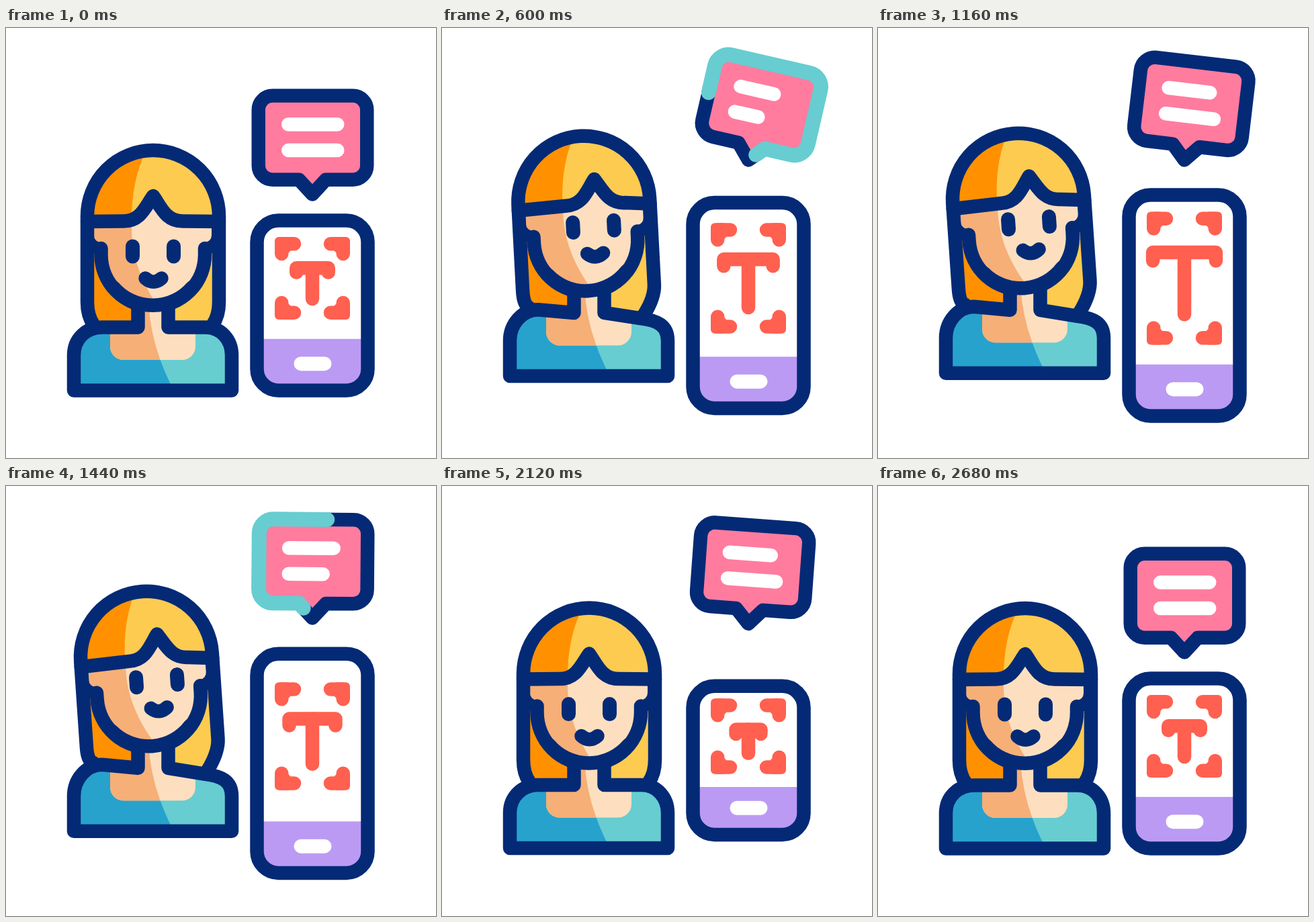
Write an HTML page with a canvas that moves like this. It is 640x640 px and loops after 3 s.

```html
<!DOCTYPE html>
<html lang="en">
<head>
<meta charset="utf-8">
<title>Text scanning</title>
<style>
html, body { margin: 0; width: 100%; height: 100%; overflow: hidden; background: #fff; }
canvas { display: block; width: 640px; height: 640px; }
</style>
</head>
<body>
<canvas id="stage" width="640" height="640"></canvas>
<script>
const ctx = document.getElementById('stage').getContext('2d');
const LOOP = 3000, STEP = 40, LINE = 20.5;
const C = {
  navy: '#042a76', orange: '#ff9100', yellow: '#fdcb50', skin: '#fddfbf', tan: '#f6af76',
  blue: '#27a2cd', teal: '#67cdd1', pink: '#ff7c9f', purple: '#bb9af3', red: '#ff6050', white: '#fff'
};

// ---- timing ----
const clamp = (v, lo, hi) => Math.min(hi, Math.max(lo, v));
const ease = (t, from, to) => (1 - Math.cos(Math.PI * clamp((t - from) / (to - from), 0, 1))) / 2;
// Rises from 0 to 1, holds, then falls back to 0.
const pulse = (t, rise, top, fall, end = t + 1) => ease(t, rise, top) - ease(t, fall, end);

// ---- drawing helpers ----
function fill(path, color) {
  ctx.fillStyle = color;
  ctx.fill(path);
}

function stroke(path, color, width = LINE) {
  ctx.strokeStyle = color;
  ctx.lineWidth = width;
  ctx.stroke(path);
}

function box(x, y, w, h, r = 0) {
  const path = new Path2D();
  path.roundRect(x, y, w, h, r);
  return path;
}

function scoped(draw) {
  ctx.save();
  draw();
  ctx.restore();
}

const clipped = (path, draw) => scoped(() => { ctx.clip(path); draw(); });
const line = (x1, y1, x2, y2) => new Path2D(`M${x1},${y1} L${x2},${y2}`);

function rotateAbout(x, y, angle) {
  ctx.translate(x, y);
  ctx.rotate(angle);
  ctx.translate(-x, -y);
}

// ---- woman ----
const MID = 219, NECK = 427, HAIR = 98, JAW = 77.25;

function drawHead(angle, sway) {
  const cos = Math.cos(angle), sin = Math.sin(angle);
  // Hair tips stay attached to the shoulders while the head tilts.
  const tip = (dx, dy) => [MID + dx * cos - dy * sin, NECK + dx * sin + dy * cos];
  const left = tip(-89 - sway, 14 - 4 * sway), right = tip(89 - 8 * sway, 14 + 8 * sway);
  const l = MID - HAIR, r = MID + HAIR;

  const hair = new Path2D(`M${left} Q${l},428 ${l},408 V280 A${HAIR},${HAIR} 0 0 1 ${r},280 V408 Q${r},428 ${right}`);
  fill(hair, C.yellow);
  clipped(hair, () => fill(new Path2D('M100,160 H222 Q184,214 187,300 L219,420 V460 H100 Z'), C.orange));

  // The parting slides sideways between its fixed ends.
  const p = dx => MID + dx + 18 * sway, low = 287.5 - 3 * sway, peak = low - 37.5;
  const fringe = `M${l},288 L${p(-44)},${low} C${p(-19)},${low} ${p(-12)},${peak + 17} ${p(0)},${peak}` +
    ` C${p(12)},${peak + 17} ${p(19)},${low} ${p(44)},${low} L${r},288`;

  fill(box(l, 288, 2 * HAIR, 47), C.navy);
  const face = new Path2D(fringe + ' Z');
  face.addPath(box(131, 280, 175, 39, [0, 0, 10.5, 10.5]));
  face.addPath(new Path2D(`M141.5,310 H296 V337 A${JAW},${JAW} 0 0 1 141.5,337 Z`));
  fill(face, C.skin);
  clipped(face, () => fill(new Path2D('M100,230 H187 V297 C187,343 203,381 230,420 H100 Z'), C.tan));

  stroke(hair, C.navy);
  stroke(new Path2D(fringe), C.navy);
  stroke(new Path2D(`M141.5,328 V337 A${JAW},${JAW} 0 0 0 296,337 V328`), C.navy);

  ctx.translate(13 * sway, -16 * sway);
  for (const side of [-1, 1]) stroke(line(MID + side * 30.5, 325, MID + side * 30.5, 340), C.navy, 21);
  stroke(new Path2D('M207.5,372.5 Q219.5,383 231.5,372.5'), C.navy);
}

function drawBody(sway) {
  const l = 445.5 - 5 * sway, r = 445.5 + 9 * sway;
  const outline = new Path2D(`M196.5,412 V445.5 L143,${l} C119,${l} 101,463 101,487` +
    ` V539.5 H336 V487 C336,464 320,${r + 3 * sway} 297,${r} L241.5,445.5 V412`);
  const shade = new Path2D('M90,400 H212 Q213,470 250,540 H90 Z');
  const collar = box(155, 400, 127, 94, [0, 0, 20, 20]);
  fill(outline, C.teal);
  clipped(outline, () => {
    fill(shade, C.blue);
    fill(collar, C.skin);
    clipped(collar, () => fill(shade, C.tan));
  });
  stroke(outline, C.navy);
}

function drawWoman(t) {
  const tilt = 3.9 * pulse(t, 40, 860, 1440, 1840) * Math.PI / 180;
  const sway = pulse(t, 40, 700, 1440, 1780);
  const withHead = draw => scoped(() => { rotateAbout(MID, NECK, -tilt); draw(); });
  ctx.translate(0, -25.7 * pulse(t, 40, 800, 1440, 2180));
  withHead(() => drawHead(tilt, sway));
  drawBody(sway);
  withHead(() => stroke(new Path2D(`M160,386 A${JAW},${JAW} 0 0 0 277,386`), C.navy));
}

// ---- phone ----
function drawBracket(x, y, sx, sy) {
  ctx.translate(x, y);
  ctx.scale(sx, sy);
  fill(box(0, 0, 20.5, 20.5, [6, 0, 0, 0]), C.red);
  fill(new Path2D('M20,20 H24 L20,24 Z'), C.red);
  stroke(new Path2D('M29,10.25 H10.25 V25'), C.red);
}

function drawPhone(t) {
  const stretch = pulse(t, 160, 860, 1380, 1970), squash = pulse(t, 1380, 1970, 2000, 2560);
  const top = 276.3 - 38 * stretch + 12.7 * squash;
  const bottom = 549.7 + 38 * stretch - 23 * squash;
  const bar = 87 - 6.5 * squash;
  const frame = box(373.5, top + LINE / 2, 165, bottom - top - LINE, 32);
  fill(frame, C.white);
  clipped(frame, () => fill(box(370, bottom - bar, 172, bar), C.purple));
  stroke(frame, C.navy);
  stroke(line(439, bottom - 50, 474, bottom - 50), C.white, 21);

  const open = pulse(t, 260, 900, 1110, 1820);
  const shrink = 5.3 * pulse(t, 1110, 1820, 2140, 2560);
  const reach = 61.5 + 38 * open - shrink;
  for (const sx of [1, -1]) {
    for (const sy of [1, -1]) scoped(() => drawBracket(456 - 56 * sx, 372.5 - reach * sy, sx, sy));
  }

  const grow = 23.5 * open - shrink, half = 23.75 + grow, y = 357.25 - grow;
  const serif = y + 6.5 + 6 * open;
  stroke(new Path2D(`M${456 - half},${serif} V${y} H${456 + half} V${serif}`), C.red);
  stroke(line(456, y, 456, 403 + grow), C.red);
}

// ---- speech bubble ----
const B = { x: 375.75, y: 100.75, w: 161.5, h: 125, r: 21, tipX: 456, tipY: 247.5, tip: 20 };
const bubble = (() => {
  const { x, y, w, h, r, tipX, tipY, tip } = B, path = new Path2D();
  path.moveTo(tipX, tipY);
  path.lineTo(tipX - tip, y + h);
  path.arcTo(x, y + h, x, y, r);
  path.arcTo(x, y, x + w, y, r);
  path.arcTo(x + w, y, x + w, y + h, r);
  path.arcTo(x + w, y + h, x, y + h, r);
  path.lineTo(tipX + tip, y + h);
  path.closePath();
  return path;
})();
const perimeter = 2 * (B.w + B.h - 4 * B.r) + 2 * Math.PI * B.r - 2 * B.tip +
  2 * Math.hypot(B.tip, B.tipY - B.y - B.h);

// A teal run chases once round the outline, then repeats.
function drawTrace(t) {
  const local = t < 1150 ? t : t - 1000, travel = 645;
  const head = travel * ease(local, 150, 760), tail = travel * ease(local, 350, 1150);
  const length = head - tail;
  if (length < 4) return;
  scoped(() => {
    ctx.setLineDash([length, perimeter - length]);
    ctx.lineDashOffset = -tail;
    stroke(bubble, C.teal, 22);
  });
}

// Two full shrink-and-grow cycles.
function textLength(t, start) {
  const cycle = clamp((t - start) / 960, 0, 2);
  return 51 + 22 * Math.cos(2 * Math.PI * cycle);
}

function drawBubble(t) {
  const tilt = 15 * pulse(t, 60, 770, 770, 1500) + 5 * pulse(t, 1360, 1960, 1960, 2560);
  ctx.translate(0, -51 * pulse(t, 60, 440, 1980, 2500));
  rotateAbout(B.tipX, B.tipY, tilt * Math.PI / 180);
  fill(bubble, C.pink);
  stroke(bubble, C.navy);
  drawTrace(t);
  stroke(line(420.25, 143.5, 420.25 + textLength(t, 360), 143.5), C.white);
  stroke(line(420.25, 182, 420.25 + textLength(t, 240), 182), C.white);
}

function draw(now) {
  const t = Math.floor((now % LOOP) / STEP) * STEP;
  fill(box(0, 0, 640, 640), C.white);
  ctx.lineCap = ctx.lineJoin = 'round';
  for (const part of [drawWoman, drawPhone, drawBubble]) scoped(() => part(t));
}

let start;
function tick(now) {
  start ??= now;
  draw(Math.max(0, now - start));
  requestAnimationFrame(tick);
}
draw(0);
requestAnimationFrame(tick);
</script>
</body>
</html>
```
